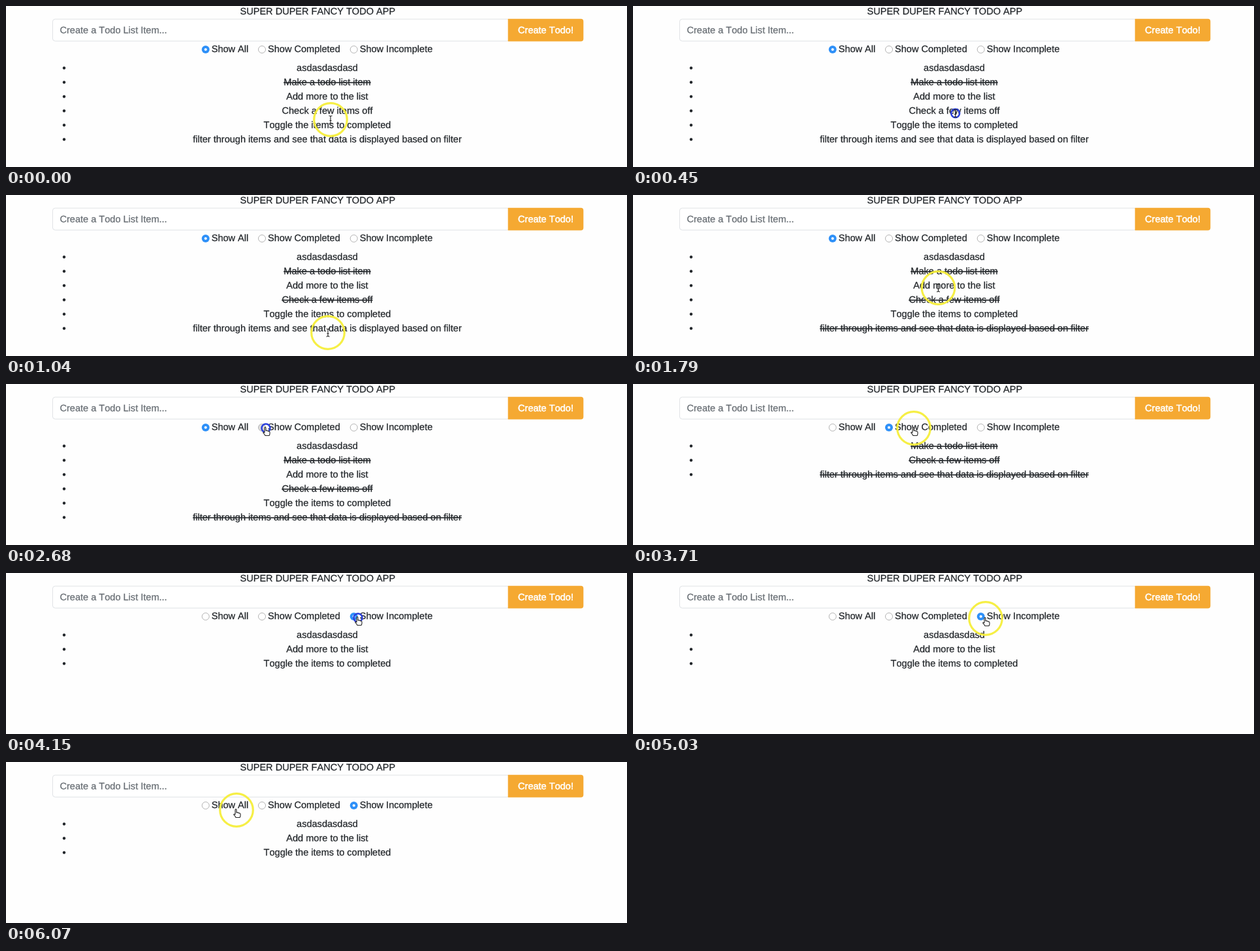
An HTML page that plays this animation: 951x248 px, repeating every 6.22 s.

```html
<!DOCTYPE html>
<html lang="en">
<head>
<meta charset="utf-8">
<title>Todo app</title>
<style>
  html, body { margin: 0; width: 100%; height: 100%; overflow: hidden; background: #fefefe; }
  svg { display: block; width: 951px; height: 248px; }
  text { font: 14.55px "Liberation Sans", Arial, sans-serif; font-kerning: none; fill: #212529;
         stroke: #212529; stroke-width: .25; text-rendering: geometricPrecision; }
  .mid { text-anchor: middle; }
  .done { text-decoration: line-through; }
  .hint { fill: #666c72; stroke: #666c72; }
  .button { fill: #fff; stroke: #fff; stroke-width: .55; }
</style>
</head>
<body>
<svg viewBox="0 0 951 248">
  <text class="mid" x="477.3" y="13">SUPER DUPER FANCY TODO APP</text>
  <rect x="71.4" y="20.2" width="700" height="33.8" rx="4" fill="#fff" stroke="#dfe2e5"/>
  <text class="hint" x="82.5" y="42">Create a Todo List Item...</text>
  <path d="M768.7 19.7H880.3a4 4 0 0 1 4 4V50.4a4 4 0 0 1-4 4H768.7Z" fill="#f5a932"/>
  <text class="button mid" x="826.5" y="42">Create Todo!</text>
  <g id="radios"></g>
  <g id="list"></g>
  <g id="pointer">
    <circle id="ring" fill="none"/>
    <path id="beam" fill="none" stroke="#222" stroke-width="1.1"
      d="M-2.5-6Q0-6 0-4.5Q0-6 2.5-6M0-5V5M-2.5 6Q0 6 0 4.5Q0 6 2.5 6M-1.5 1.5H1.5"/>
    <path id="hand" fill="#fff" stroke="#222" stroke-width="1.1" stroke-linejoin="round"
      d="M-2 5V0Q-2-1.5-1-1.5T0 0V4Q1.2 3 2 4.3Q3.2 3.6 4 5Q6 4.4 6 6.5V8.5Q6 10 5 11.5H-1Q-1.5 9.8-4 7.3Q-4.6 5.4-2 6.8Z"/>
  </g>
</svg>
<script>
const LOOP = 6220, STEP = 148.1;
const $ = id => document.getElementById(id);

// Each item: label, step at which it gets completed
const items = [
  ["asdasdasdasd", Infinity],
  ["Make a todo list item", 0],
  ["Add more to the list", Infinity],
  ["Check a few items off", 4],
  ["Toggle the items to completed", Infinity],
  ["filter through items and see that data is displayed based on filter", 9],
];
const filters = [["Show All", 305.7], ["Show Completed", 392], ["Show Incomplete", 532.7]];

// Pointer path: step, x, y
const path = [
  [0, 497, 175], [2, 494, 164], [5, 493, 168], [7, 493, 212], [9, 493, 212], [10, 491, 198],
  [12, 467.5, 143], [14, 420, 84], [15, 398, 68], [24, 398, 68], [25, 430, 68],
  [27, 539, 69], [32, 539, 69], [33, 575, 92], [34, 540, 70], [35, 430, 58], [36, 353, 74],
];
// Mouse button: first step down, step of release ripple
const clicks = [[3, 4], [8, 9], [18, 22], [27, 29]];

function pointerAt(step) {
  const i = path.findIndex(p => p[0] > step);
  if (i < 0) return path.at(-1).slice(1);
  const [a, b] = [path[i - 1], path[i]];
  const k = (step - a[0]) / (b[0] - a[0]);
  return [a[1] + (b[1] - a[1]) * k, a[2] + (b[2] - a[2]) * k];
}

function radio([label, x], checked, pressed) {
  const disc = checked
    ? `<circle cx="${x}" cy="67" r="6" fill="#2e90f8"/><circle cx="${x}" cy="67" r="2.1" fill="#fff"/>`
    : `<circle cx="${x}" cy="67" r="5.5" fill="${pressed ? "#ddd" : "#fff"}" stroke="#b4b4b4"/>`;
  return `${disc}<text x="${x + 9}" y="70.7">${label}</text>`;
}

function row([label, doneAt], index, step) {
  const y = 100 + 22 * index;
  return `<circle cx="89" cy="${y - 4.5}" r="2.2" fill="#212529"/>
    <text class="mid ${step >= doneAt ? "done" : ""}" x="492" y="${y}">${label}</text>`;
}

function setRing(radius, color, width) {
  $("ring").setAttribute("r", radius);
  $("ring").setAttribute("stroke", color);
  $("ring").setAttribute("stroke-width", width);
}

function render(step) {
  const filter = step >= 28 ? 2 : step >= 21 ? 1 : 0;
  const down = clicks.some(([from, to]) => step >= from && step < to);
  const ripple = clicks.some(([, to]) => step === to);
  const [x, y] = pointerAt(step);
  const onLabel = step >= 15;

  $("radios").innerHTML = filters
    .map((f, i) => radio(f, i === filter, down && Math.abs(x - f[1]) < 10 && onLabel)).join("");
  $("list").innerHTML = items
    .filter(([, doneAt]) => !filter || (step >= doneAt) === (filter === 1))
    .map((item, i) => row(item, i, step)).join("");

  $("pointer").setAttribute("transform", `translate(${x} ${y})`);
  $("beam").style.display = onLabel ? "none" : "";
  $("hand").style.display = onLabel ? "" : "none";
  if (down) setRing(6.5, "#2a3fdc", 2.5);
  else if (ripple) setRing(11.5, "rgba(110,120,180,.3)", 2.5);
  else setRing(25.3, "rgba(246,239,60,.95)", 3.2);
}

let shown = -1;
function tick() {
  const step = Math.floor((performance.now() % LOOP + 5) / STEP) % 42;
  if (step !== shown) render(shown = step);
  requestAnimationFrame(tick);
}
tick();
</script>
</body>
</html>
```
